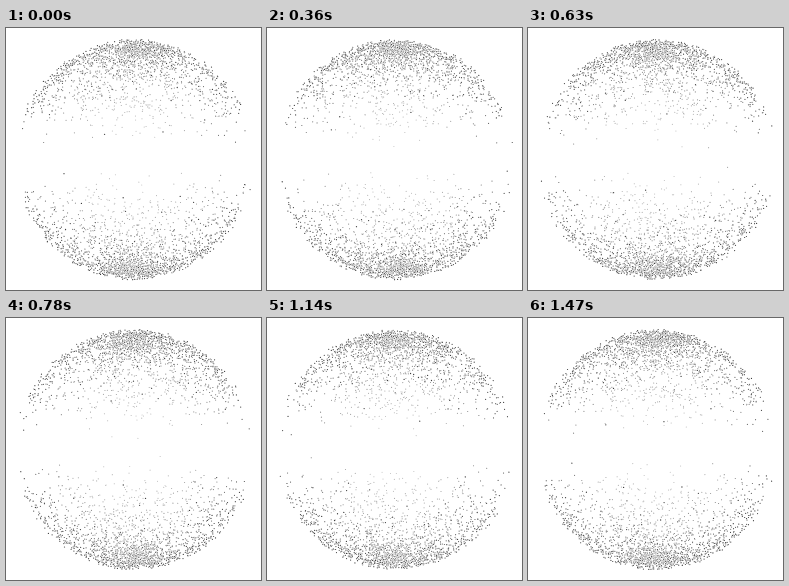
These frames come from a looping animation (255 px wide and 262 px high, 1.5 s). An HTML page with a canvas:

```html
<!DOCTYPE html>
<html lang="en">
<head>
<meta charset="utf-8">
<title>Turning dot sphere</title>
<style>
html, body { margin: 0; width: 100%; height: 100%; overflow: hidden; background: #fff; }
canvas { display: block; width: 255px; height: 262px; }
</style>
</head>
<body>
<canvas id="stage" width="255" height="262"></canvas>
<script>
const ctx = document.getElementById('stage').getContext('2d');
const LOOP = 1500, STEP = 30;
const CX = 128.5, CY = 131.5;
const SIZE = 109;   // projected distance from centre to a pole
const NEAR = 0.39;  // sphere radius over camera distance
const COUNT = 3600;
const GAP = 0.06;   // height of the empty belt
const SPREAD = 0.12;

let seed = 20177;
function random() {
  seed = (seed + 0x6D2B79F5) | 0;
  let n = Math.imul(seed ^ (seed >>> 15), 1 | seed);
  n = (n + Math.imul(n ^ (n >>> 7), 61 | n)) ^ n;
  return ((n ^ (n >>> 14)) >>> 0) / 4294967296;
}

// Axis distance is nearly uniform, so dots gather at the poles and thin out at the belt.
const dots = Array.from({ length: COUNT }, (_, i) => {
  const u = (random() + SPREAD * random()) / (1 + SPREAD);
  const s = Math.sqrt(1 - u * u);
  const y = (i % 2 ? s : -s) + GAP * (1 - s);
  const shell = 0.965 + 0.05 * random();
  return { y: y * shell, r: Math.sqrt(1 - y * y) * shell, a: random() * 2 * Math.PI };
});

function disc(x, y, r, color) {
  ctx.fillStyle = color;
  ctx.beginPath();
  ctx.arc(x, y, r, 0, 2 * Math.PI);
  ctx.fill();
}

function draw(ms) {
  const turn = Math.floor((ms % LOOP) / STEP) * STEP / LOOP * 2 * Math.PI;
  const view = dots.map(d => {
    const scale = 1 / (1 - NEAR * d.r * Math.cos(d.a + turn));
    return {
      x: CX + SIZE * scale * d.r * Math.sin(d.a + turn),
      y: CY - SIZE * scale * d.y,
      scale
    };
  }).sort((p, q) => p.scale - q.scale);

  ctx.fillStyle = '#fff';
  ctx.fillRect(0, 0, 255, 262);
  for (const { x, y, scale } of view) {
    const light = Math.max(24, 34 / scale ** 2.5);
    const r = 0.45 + 0.13 * scale;
    disc(x, y, r + 0.42, '#fff');
    disc(x, y, r, `hsl(0, 0%, ${light}%)`);
  }
}

const start = performance.now();
function tick() {
  draw(performance.now() - start);
  requestAnimationFrame(tick);
}
tick();
</script>
</body>
</html>
```
